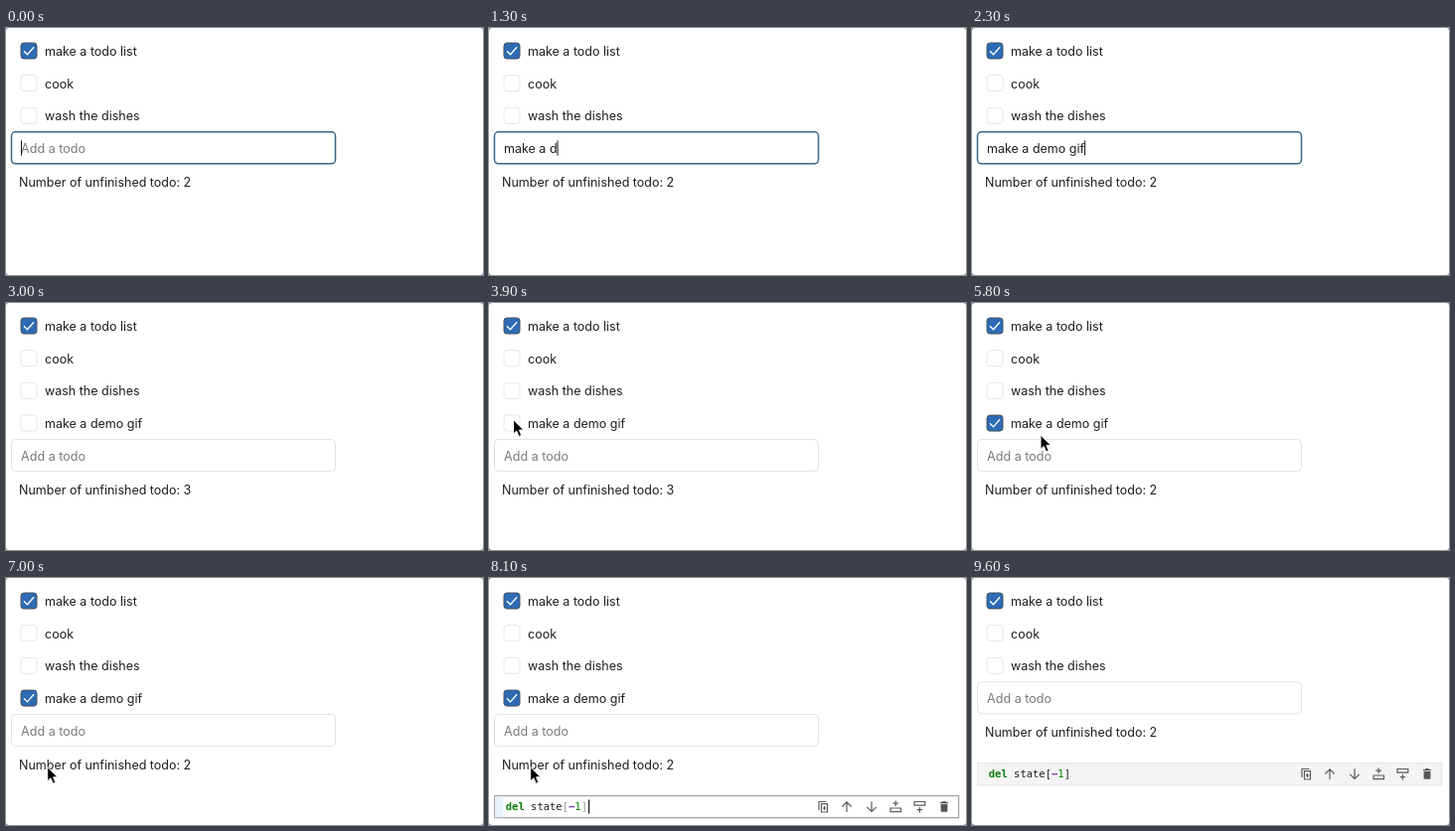
Recreate the animation shown at these times as an HTML page. Size 480 by 249 pixels, loop 9.8 s.

```html
<!DOCTYPE html>
<html lang="en">
<head>
<meta charset="utf-8">
<title>Todo list</title>
<style>
  html, body { margin: 0; width: 100%; height: 100%; overflow: hidden; background: #777; }
  svg { display: block; width: 480px; height: 249px; }
  text { font: 12.5px Inter, "Open Sans", sans-serif; fill: #1f1f1f; white-space: pre; }
  .hint { font-size: 12.6px; fill: #7a7a7a; }
  .bold { font-size: 12.8px; font-weight: 700; }
  .code { font: 10.5px "DejaVu Sans Mono", monospace; }
  .key { fill: #0a7a0a; font-weight: 700; }
  .num { fill: #080; }
  .op { fill: #7a2fb0; font-weight: 700; }
  .icon { fill: none; stroke: #5c5c5c; stroke-width: 1.2; }
</style>
</head>
<body>
<svg id="stage" viewBox="0 0 480 249"></svg>
<script>
const LOOP = 9800, STEP = 100, ROW = 32.7;
const ADDED = 3000, CHECKED = 4400, CELL = 7400, EDIT = 7700, PASTED = 8100, RUN = 8500, REMOVED = 8600;
const stage = document.getElementById('stage');
const pen = document.createElement('canvas').getContext('2d');

const TYPED = 'make a demo gif';
const KEYS = [400, 500, 600, 800, 900, 1100, 1200, 1300, 1500, 1600, 1700, 1900, 2100, 2200, 2300];

// pointer track: time, x, y
const TRACK = [
  [3500, 157, 40], [4000, 19, 121], [4800, 19, 121], [4900, 46, 119.5],
  [5200, 69, 133.2], [6600, 69, 133.2], [7000, 41.7, 190.5], [9300, 41.7, 190.5], [9500, 121, 233]
];

const rect = (x, y, w, h, fill, stroke = 'none', rx = 0, sw = 1) =>
  `<rect x="${x}" y="${y}" width="${w}" height="${h}" rx="${rx}" fill="${fill}" stroke="${stroke}" stroke-width="${sw}"/>`;
const text = (x, y, s, cls = '') => `<text x="${x}" y="${y}" class="${cls}">${s}</text>`;
const at = (x, y, s) => `<g transform="translate(${x} ${y})">${s}</g>`;
const path = (d, attrs) => `<path d="${d}" ${attrs}/>`;

function todo(i, label, done, hover, bold) {
  const box = done
    ? rect(15, 15, 16, 16, hover ? '#2a5a8e' : '#2d6bb4', '#465461', 3) +
      path('M18 23.2l3.5 3.6 6.6-7.6', 'fill="none" stroke="#fff" stroke-width="1.3"')
    : rect(15, 15, 16, 16, '#fff', '#e6e6e6', 3);
  return at(0, i * ROW, box + text(39, 28, label, bold ? 'bold' : ''));
}

function input(t) {
  const focus = t < ADDED;
  const value = focus ? TYPED.slice(0, KEYS.filter(k => k <= t).length) : '';
  pen.font = '12.5px Inter, "Open Sans", sans-serif';
  const caretX = 15 + pen.measureText(value).width;
  return rect(5.5, 104.8, 326, 32, '#fff', focus ? '#3b6583' : '#e2e2e2', 4, focus ? 1.5 : 1) +
    (value ? text(15, 126.2, value) : text(15, 126.2, 'Add a todo', 'hint')) +
    (focus && t < 2800 ? rect(caretX, 113.5, 1, 15, '#111') : '');
}

const ICONS =
  path('M332 15V6.5h7.5M334.5 8.7h6v8.3h-6zM337.5 11v4M335.8 13h3.6' +
    'M360 17V6.8M355.3 11.5L360 6.8l4.7 4.7M385 6.3v10.2M380.3 11.8l4.7 4.7 4.7-4.7' +
    'M404 13h10.5v3.6H404zM409.2 5.5v5.4M406.5 8.2h5.4' +
    'M428 6.5h10.8v3.6H428zM433.4 12v5.4M430.7 14.7h5.4', 'class="icon"') +
  path('M454 7h2l.7-1h2.6l.7 1h2v1.3h-8zM454.6 9h6.8v6.8q0 1-1 1h-4.8q-1 0-1-1z', 'fill="#555"');

const CODE = '<tspan class="key">del</tspan> state[<tspan class="op">−</tspan><tspan class="num">1</tspan>]';
const CODE_EDIT = CODE.replace(/[\[\]]/g, c => `<tspan fill="#909a90">${c}</tspan>`);

function cell(t) {
  const edit = t >= EDIT && t < RUN, full = t >= PASTED;
  return rect(5.7, .7, 467, 22, edit ? '#fff' : '#f4f4f4', edit ? '#868e98' : '#e4e4e4') +
    (edit ? rect(6.2, 1.2, 8, 21, '#e8f0fa') : '') +
    (full ? text(16.8, 15, edit ? CODE_EDIT : CODE, 'code') : '') +
    (edit ? rect(full ? 100 : 17, 4.5, 1.2, 14, '#111') : '') + ICONS;
}

const ARROW = path('M0 0V14.3L3.2 11.3 5.6 16.8 8.2 15.7 5.9 10.3H10.4z', 'fill="#000" stroke="#fff"');
const HAND = path('M-1.6 10V.9C-1.6-.6 1-.6 1 .9V6C1.6 4.9 3.7 5.1 3.8 6.6 4.6 5.6 6.3 6 6.5 7.3 7.4 6.6 9 7.1 9 8.6' +
  'V12C9 14 7.6 15 7.6 17.5H.2C.2 15.5-2 13.5-3 11.6-4.2 9.6-3 8.4-1.6 10zM1.6 11.5v3.5M3.8 11.5v3.5M6 11.5v3.5M1 6v3M3.8 6.6V9M6.5 7.3v2',
  'fill="#fff" stroke="#111"');
const BEAM = path('M-2.5-6.5Q0-6.5 0-5V5Q0 6.5-2.5 6.5M2.5-6.5Q0-6.5 0-5V5Q0 6.5 2.5 6.5M-1.3 2.5h2.6', 'fill="none" stroke="#222"');

function pointer(t) {
  const i = TRACK.findIndex(k => k[0] > t);
  if (t < TRACK[0][0] || t >= 9600) return '';
  const b = TRACK[i < 0 ? TRACK.length - 1 : i], a = i < 0 ? b : TRACK[i - 1];
  const p = b === a ? 0 : (t - a[0]) / (b[0] - a[0]), e = p * (2 - p);
  const shape = t >= 4000 && t < 5100 ? HAND : t >= REMOVED && t < 9400 ? BEAM : ARROW;
  return at(a[1] + (b[1] - a[1]) * e, a[2] + (b[2] - a[2]) * e, shape);
}

function draw(t) {
  const extra = t >= ADDED && t < REMOVED, done = t >= CHECKED;
  const left = extra && !done ? 3 : 2;
  const shift = extra ? ROW : 0;
  return rect(0, 0, 480, 249, '#fff', 'none', 3) +
    todo(0, 'make a todo list', true) + todo(1, 'cook') + todo(2, 'wash the dishes') +
    (extra ? todo(3, TYPED, done, t < 5100, t >= 4900 && t < 5100) : '') +
    at(0, shift, input(t) + text(13, 160.3, 'Number of unfinished todo: ' + left)) +
    (t >= CELL ? at(0, extra ? 219 : 186, cell(t)) : '') + pointer(t);
}

let shown = -1;
const start = performance.now();
function tick() {
  const t = Math.floor((performance.now() - start) % LOOP / STEP) * STEP;
  if (t !== shown) stage.innerHTML = draw(shown = t);
  requestAnimationFrame(tick);
}
tick();
</script>
</body>
</html>
```
